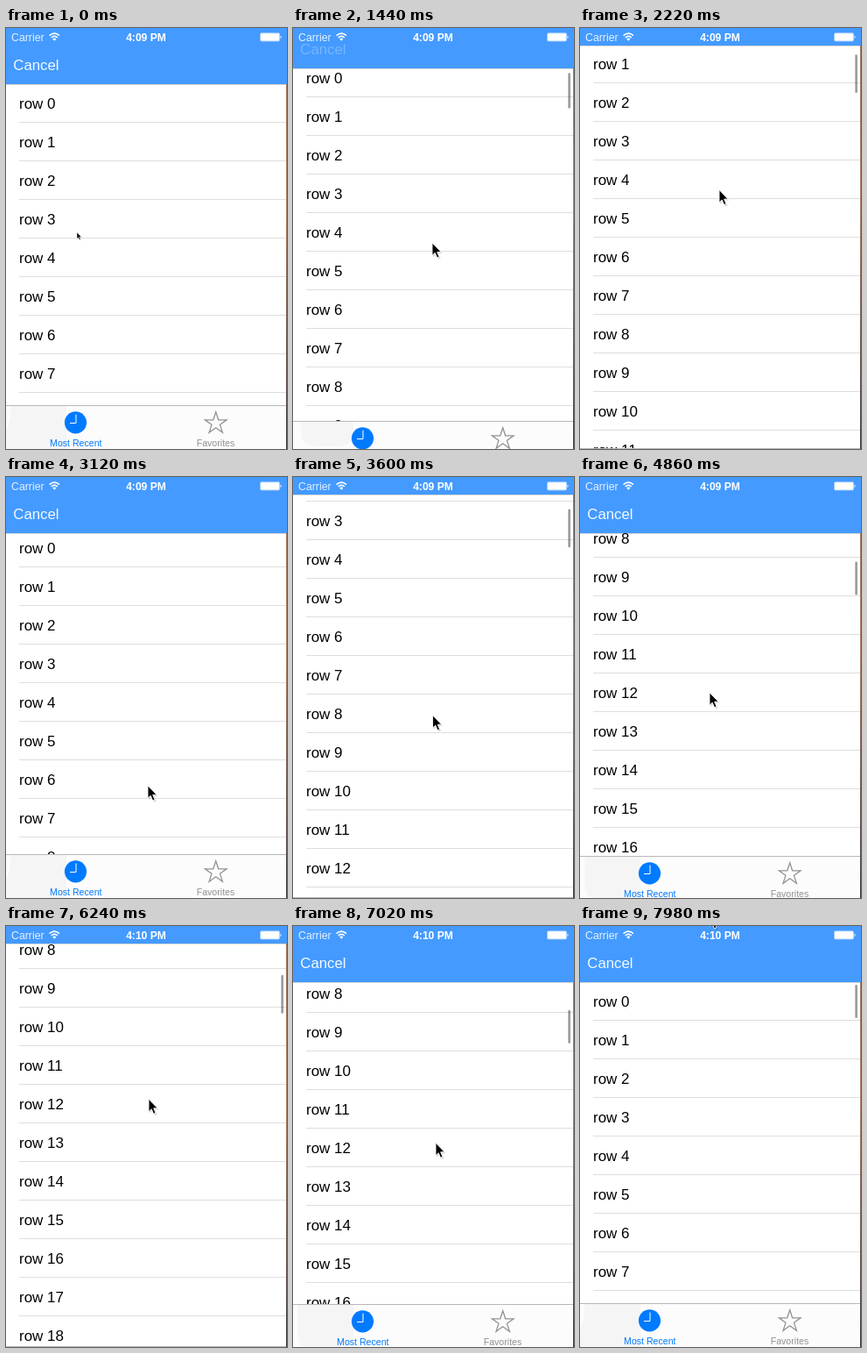
An HTML page that plays this animation: 321 by 480 pixels, repeating every 8040 ms.

```html
<!DOCTYPE html>
<html lang="en">
<head>
<meta charset="utf-8">
<title>Scrolling list with collapsing bars</title>
<style>
  html, body { margin: 0; width: 100%; height: 100%; overflow: hidden; background: #fff; }
  svg { display: block; width: 100vw; height: 100vh; }
  text { font-family: "Liberation Sans", Arial, sans-serif; white-space: pre; }
</style>
</head>
<body>
<svg viewBox="0 0 321 480">
  <defs>
    <linearGradient id="edge" x2="0" y2="1">
      <stop offset="0" stop-color="#9a6c54"/>
      <stop offset=".4" stop-color="#a87858"/>
      <stop offset="1" stop-color="#303036"/>
    </linearGradient>
    <clipPath id="tabClip"><rect y="1" width="320" height="60"/></clipPath>
  </defs>
  <rect width="321" height="480" fill="#fff"/>
  <g id="rows" font-size="17"></g>
  <rect id="thumb" x="314.3" width="2.6" rx="1.3"/>

  <g id="tab">
    <rect width="320" height="60" fill="#fcfcfc"/>
    <g clip-path="url(#tabClip)"><path id="patch" fill="#f5f5f5"/></g>
    <rect width="320" height="1" fill="#b8b8b8"/>
    <circle cx="79.5" cy="19.8" r="12.6" fill="#007aff"/>
    <path d="M80 10.5V20.5H73" fill="none" stroke="#fff"/>
    <path id="star" fill="none" stroke="#929292" stroke-width="1.3"/>
    <g font-size="10.6" text-anchor="middle">
      <text x="79.8" y="46.5" fill="#007aff">Most Recent</text>
      <text x="239.5" y="46.5" fill="#929292">Favorites</text>
    </g>
  </g>

  <rect x="320" y="20" width="1" height="460" fill="url(#edge)"/>
  <rect id="nav" width="321" fill="#449aff"/>
  <rect id="navLine" width="320" height="1" opacity=".16"/>
  <text id="cancel" x="8.3" font-size="16.8" fill="#f4f9ff">Cancel</text>

  <g fill="#fff">
    <text x="6" y="14.8" font-size="12.3" fill="#e6f1ff">Carrier</text>
    <g fill="none" stroke="#fff" stroke-width="1.6">
      <path d="M49.6 8.6Q55.3 3.6 61 8.6"/>
      <path d="M51.7 11Q55.3 7.9 58.9 11"/>
    </g>
    <path d="M53.2 12.4Q55.3 10.6 57.4 12.4L55.3 14.8Z"/>
    <text id="clock" x="160" y="14.5" font-size="12.1" font-weight="700" text-anchor="middle"></text>
    <rect x="290" y="5.3" width="23" height="10.2" rx="2" opacity=".5"/>
    <rect x="291" y="6.3" width="21" height="8.2" rx="1"/>
    <path d="M313.5 8.6Q315.6 10.4 313.5 12.2Z"/>
  </g>

  <g id="cursor">
    <path d="M1 1.5V16L4.4 13 7 18.8 9.6 17.6 7.2 12H11.6Z" opacity=".16"/>
    <path d="M0 0V14.4L3.2 11.4 5.6 17 8 16 5.7 10.5H10.2Z" stroke="#fff" stroke-width=".9"/>
  </g>
</svg>
<script>
const LOOP = 8040, STEP = 60, ROW = 44, SLACK = 11, NAV = 44, TAB = 49;
const $ = id => document.getElementById(id);
const clamp = (v, lo, hi) => Math.min(hi, Math.max(lo, v));
const ramp = (t, a, b) => clamp((t - a) / (b - a), 0, 1);
const ease = u => u * u * (3 - 2 * u);
const set = (node, attrs) => {
  for (const k in attrs) node.setAttribute(k, attrs[k]);
};

// Each gesture: from, to, distance scrolled.
const scrolls = [
  [960, 1140, 14], [1260, 1900, 78], [2160, 2760, -92],
  [3055, 3700, 180], [3780, 4165, 246], [4400, 5075, -76],
  [5700, 6400, 70], [6540, 7260, -80], [7440, 7900, -340]
];
// The pointer drags the list; between drags it is moved: from, to, dx, dy.
const moves = [
  [180, 760, 78, 41], [2760, 3040, 3, 83], [3480, 3780, -7, 236],
  [4250, 4400, -7, 21], [5220, 5640, 15, -6], [7320, 7900, -15, -622]
];
const sum = (list, t, col) =>
  list.reduce((acc, m) => acc + m[col] * ease(ramp(t, m[0], m[1])), 0);
const scrollAt = t => sum(scrolls, t, 2);

// Bars follow the scroll after a little slack in each direction.
function barOffsets(end) {
  let pos = 0, nav = 0, tab = 0;
  for (let t = 0; t <= end; t += 20) {
    const s = scrollAt(t);
    const next = clamp(pos, s - SLACK, s);
    nav = clamp(nav + next - pos, 0, NAV);
    tab = clamp(tab + next - pos, 0, TAB);
    pos = next;
  }
  return { nav: Math.round(nav), tab: Math.round(tab) };
}

const svgNode = (name, parent, attrs) => {
  const n = document.createElementNS("http://www.w3.org/2000/svg", name);
  set(n, attrs);
  return parent.appendChild(n);
};

const rows = Array.from({ length: 13 }, () => {
  const g = svgNode("g", $("rows"), {});
  const label = svgNode("text", g, { x: 15, y: 27.6 });
  svgNode("rect", g, { x: 15, y: 43, width: 305, height: 1, fill: "#dededf" });
  return { g, label };
});

const starPoints = Array.from({ length: 10 }, (_, i) => {
  const r = i % 2 ? 5 : 13, a = i * Math.PI / 5;
  return `${(239.7 + r * Math.sin(a)).toFixed(2)} ${(20.8 - r * Math.cos(a)).toFixed(2)}`;
});
set($("star"), { d: `M${starPoints.join("L")}Z` });

// Pale smudge behind the first tab, shrinking as the bar slides away.
function patchPath(tab) {
  if (tab < 1) return "M5 0H69V50H0V30Q6 18 5 0Z";
  const left = 5 + tab * .23, bottom = 52 - tab * 1.28;
  return `M${left} 0H69V${bottom - 14}Q67 ${bottom} 52 ${bottom}H${left + 18}`
    + `Q${left} ${bottom} ${left} ${bottom - 16}Z`;
}

function draw(t) {
  const scroll = scrollAt(t);
  const { nav, tab } = barOffsets(t);
  const navEnd = 64 - nav;

  const first = Math.max(0, Math.floor((scroll - NAV) / ROW));
  rows.forEach(({ g, label }, i) => {
    const n = first + i;
    set(g, { transform: `translate(0 ${64 + n * ROW - Math.round(scroll)})` });
    label.textContent = "row " + n;
  });

  set($("nav"), { height: navEnd });
  set($("navLine"), { y: navEnd });
  set($("cancel"), { y: 48 - nav, opacity: 1 - ramp(nav, 0, 25) });
  set($("tab"), { transform: `translate(0 ${430 + tab})` });
  set($("patch"), { d: patchPath(tab) });

  const shown = ramp(t, 1020, 1140) - ramp(t, 2760, 2940) + ramp(t, 3120, 3240);
  set($("thumb"), {
    y: navEnd + 3 + scroll * .08,
    height: 38 + .064 * (nav + tab),
    opacity: .4 * shown
  });

  $("clock").textContent = t < 5940 ? "4:09 PM" : "4:10 PM";
  const x = 81 + sum(moves, t, 2), y = 233 + sum(moves, t, 3) - scroll;
  const size = .5 + .5 * ramp(t, 180, 360);
  set($("cursor"), { transform: `translate(${x} ${y}) scale(${size})` });
}

const start = performance.now();
function tick() {
  const t = (performance.now() - start) % LOOP;
  draw(Math.floor(t / STEP) * STEP);
  requestAnimationFrame(tick);
}
tick();
</script>
</body>
</html>
```
